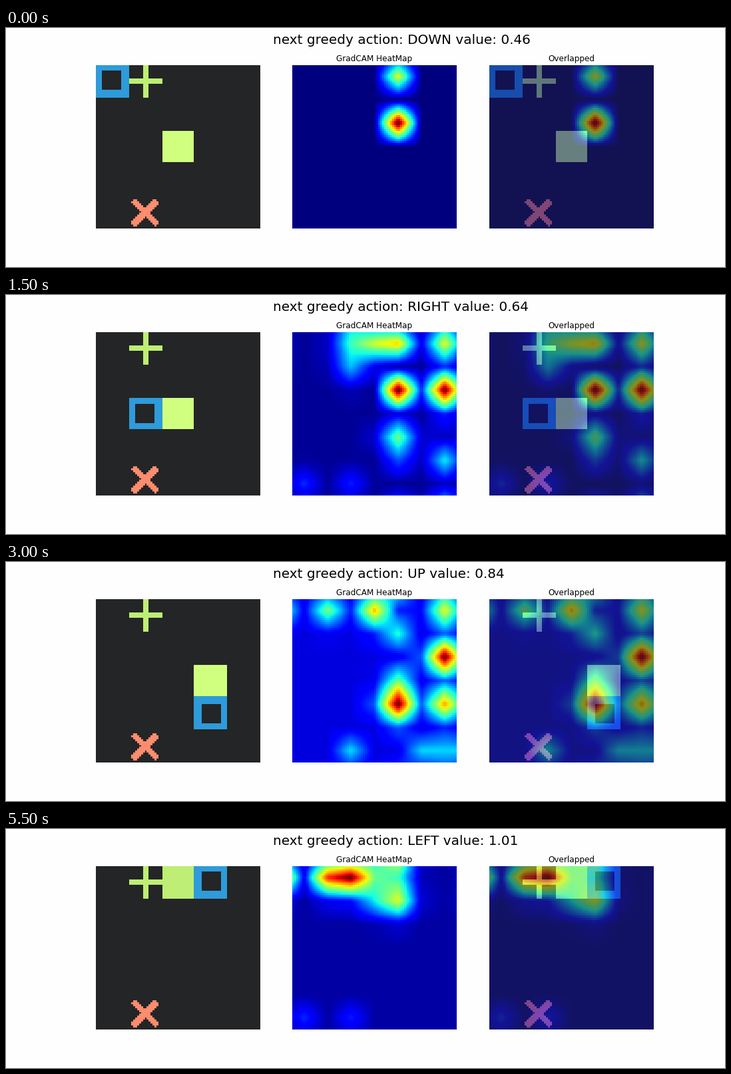
Write a matplotlib script that moves like this. It is 1080 px wide and 360 px high and loops after 6 s.

```python
import matplotlib.pyplot as plt
import numpy as np
from matplotlib.animation import FuncAnimation

W, H, DPI = 1080, 360, 72
N = 84                              # board resolution
FLOOR = (36, 37, 38)
BLUE = (46, 155, 218)
LIME = (190, 238, 115)
PALE = (208, 255, 128)
SALMON = (255, 140, 110)

ACTIONS = "DOWN RIGHT DOWN RIGHT DOWN RIGHT UP UP RIGHT UP LEFT LEFT".split()
VALUES = (.46, .52, .64, .64, .65, .74, .84, .82, .86, .91, .96, 1.01)
MOVES = {"DOWN": (0, 1), "UP": (0, -1), "LEFT": (-1, 0), "RIGHT": (1, 0)}


def glow(base, halo, *spots):
    """7 x 7 activations: each (row, column, strength) fades by halo per cell."""
    rows, cols = np.mgrid[:7, :7]
    grid = np.full((7, 7), float(base))
    for r, c, strength in spots:
        dist = np.abs(rows - r) + np.abs(cols - c)
        grid = np.maximum(grid, strength * float(halo) ** dist)
    return grid


def upsample(grid):
    """Bilinear resize with mirrored borders, scaled to a peak of one."""
    padded = np.pad(grid, 1, mode="reflect")
    pos = (np.arange(N) + .5) * 7 / N + .5
    weights = np.clip(1 - np.abs(pos[:, None] - np.arange(9)), 0, 1)
    out = weights @ padded @ weights.T
    return out / out.max()


START = (0, 4, .58), (2, 4, 1)
FAINT = (6, 0, .16), (6, 2, .15)
GLOWS = {
    0: glow(0, 0, *START),
    2: glow(0, 0, *START, (5, 4, .12)),
    4: glow(.02, .15, *FAINT, (0, 2, .4), (0, 3, .58), (0, 6, .6), (1, 2, .3),
            (2, 6, 1), (4, 4, .47), (5, 6, .35)),
    6: glow(.08, .2, (0, 1, .48), (0, 3, .7), (0, 6, .6), (1, 4, .38), (2, 6, 1),
            (3, 4, .45), (4, 4, 1), (4, 6, .72), (6, 2, .33), (6, 5, .32), (6, 6, .32)),
    7: glow(.04, .12, *FAINT, (0, 2, .33), (0, 3, 1), (0, 6, .57), (2, 4, .53),
            (2, 6, .42), (4, 6, .22)),
    9: glow(.03, .1, *FAINT, (0, 1, .34), (0, 2, .28), (0, 3, 1), (0, 4, .95),
            (0, 6, .6), (1, 0, .18), (1, 6, .5), (2, 6, .22)),
    11: glow(.03, .12, *FAINT, (0, 1, .84), (0, 2, 1), (0, 3, .46), (0, 4, .4),
             (1, 3, .35), (1, 4, .6)),
}


def heat(step):
    if step in GLOWS:
        return upsample(GLOWS[step])
    return upsample((GLOWS[step - 1] + GLOWS[step + 1]) / 2)


def walk():
    """Player and box cell at every step; the player pushes the box."""
    player, box = (0, 0), (2, 2)
    path = []
    for action in ACTIONS:
        path.append((player, box))
        dx, dy = MOVES[action]
        player = player[0] + dx, player[1] + dy
        if player == box:
            box = box[0] + dx, box[1] + dy
    return path


def cell(pos):
    x, y = (slice(round(N / 5 * k), round(N / 5 * (k + 1))) for k in pos)
    return y, x


def cross():
    y, x = np.mgrid[:N, :N] + .5
    dx, dy = x - 25, y - 76
    falling = (dx - dy > -2) & (dx - dy <= 2)
    rising = np.abs(dx + dy) <= 2
    ends = (np.abs(dx) + np.abs(dy) <= 12) & (np.maximum(np.abs(dx), np.abs(dy)) < 7)
    return (falling | rising) & ends


def board(step):
    player, box = PATH[step]
    img = np.full((N, N, 3), FLOOR, np.uint8)
    img[7:10, 17:34] = img[0:17, 24:27] = LIME
    img[cross()] = SALMON
    # the box dims as it nears the top row
    img[cell(box)] = np.array(LIME) + (np.array(PALE) - LIME) * box[1] / 2
    img[cell(player)] = BLUE
    x, y = (17 * k + 3 for k in player)
    img[y:y + 10, x:x + 10] = FLOOR
    return img


PATH = walk()

plt.rcParams["font.family"] = "DejaVu Sans"
fig = plt.figure(figsize=(W / DPI, H / DPI), dpi=DPI, facecolor="#fefefe")
side = 837 / 3.4
images = []
for k, name in enumerate(("", "GradCAM HeatMap", "Overlapped")):
    ax = fig.add_axes([(135 + 1.2 * side * k) / W, 57.8 / H, side / W, side / H])
    ax.set_title(name, fontsize=12)
    ax.axis("off")
    images.append(ax.imshow(np.zeros((N, N, 3), np.uint8), interpolation="nearest"))
headline = fig.text(401 / W, 1 - 24 / H, "", fontsize=20, va="baseline")


def draw(step):
    scene = board(step)
    hot = plt.cm.jet(heat(step), bytes=True)[..., :3]
    mix = (scene * .5 + hot * .5).astype(np.uint8)
    for image, data in zip(images, (scene, hot, mix)):
        image.set_data(data)
    headline.set_text(f"next greedy action: {ACTIONS[step]} value: {VALUES[step]:.2f}")
    return [*images, headline]


anim = FuncAnimation(fig, draw, frames=len(ACTIONS), interval=500, repeat=True, repeat_delay=0)
plt.show()
```
